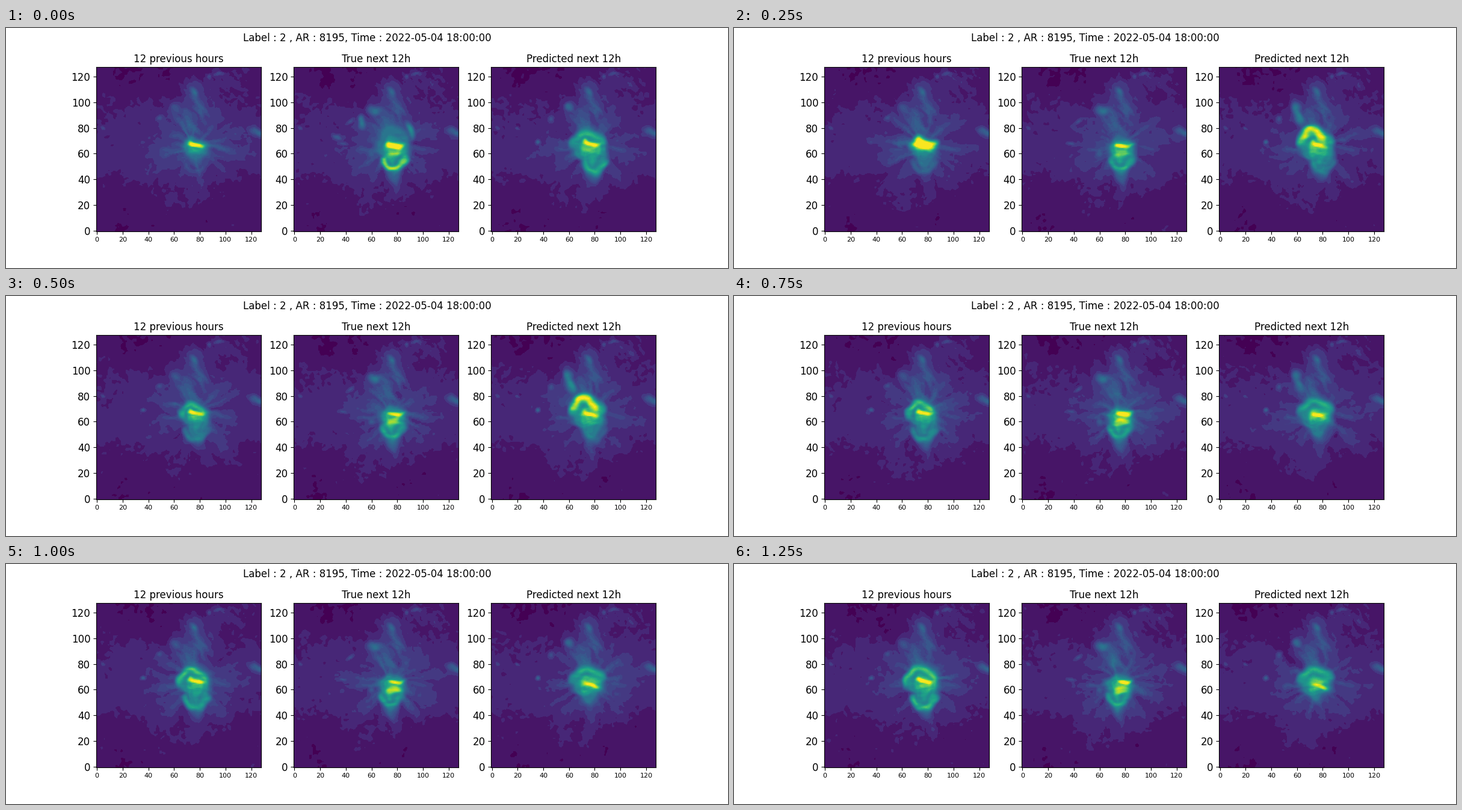
Animation of 1200 by 400 pixels, one loop 1500 ms. Source, as a matplotlib script:

```python
import numpy as np
import matplotlib.pyplot as plt
from matplotlib.animation import FuncAnimation
from matplotlib.colors import ListedColormap

N, FRAMES = 128, 6
plt.rcParams["font.family"] = "DejaVu Sans"


def noise(seed, sx, sy=None):
    """Periodic Gaussian-smoothed noise with unit deviation."""
    fx, fy = np.fft.fftfreq(N)[None, :], np.fft.fftfreq(N)[:, None]
    sy = sx if sy is None else sy
    keep = np.exp(-2 * np.pi**2 * ((sx * fx) ** 2 + (sy * fy) ** 2))
    raw = np.random.default_rng(seed).normal(size=(N, N))
    out = np.fft.ifft2(np.fft.fft2(raw) * keep).real
    out -= out.mean()
    return out / out.std()


gy, gx = np.mgrid[:N, :N].astype(float)
X = gx + 0.8 * noise(1, 3)
Y = gy + 0.8 * noise(2, 3)

# Streaks that run down to the right, and rays that leave the core
along, across = 0.6 * X - 0.8 * Y, 0.8 * X + 0.6 * Y
STREAK = noise(5, 4, 1.1)[across.astype(int) % N, along.astype(int) % N]
DIST = np.hypot(X - 76, Y - 66)
THETA = (np.arctan2(Y - 66, X - 76) / (2 * np.pi) * N).astype(int) % N
WAVE = 1.1 * np.sin((X - 69) / 2.6)


def blob(x, y, sx, sy, level, angle=0, power=1):
    a = np.radians(angle)
    dx, dy = X - x, Y - y
    u = (dx * np.cos(a) + dy * np.sin(a)) / sx
    v = (dy * np.cos(a) - dx * np.sin(a)) / sy
    return level * np.exp(-((u * u + v * v) ** power))


def lobe(x, y, half, end, level, q=2.0, stripe=0.07):
    """Half of a rounded shape, from y towards end, with nested bands."""
    h = end - y
    t = (Y - y) / h
    t = np.where(t < 0, -t * abs(h) / 7, t)
    u = (np.abs((X - x) / half) ** q + t**q) ** (1 / q)
    return level * np.clip(1 - u**2.6, 0, 1) * (1 + stripe * np.cos(21 * u))


def arch(x, y, rx, h, width, level):
    dy = (Y - y) / h
    ring = np.exp(-(((np.hypot((X - x) / rx, dy) - 1) * min(rx, abs(h)) / width) ** 2))
    return level * ring / (1 + np.exp(-6 * dy - 0.5))


def core(x, y, sx, sy, level, angle):
    return blob(x, y + WAVE, sx, sy, level, angle, 1.5)


def pulse(s, at, width):
    return np.exp(-(((s - at) / width) ** 4))


def before(s):
    """The region grows after a short burst."""
    burst, grown = pulse(s, 1, 0.7), min(s / 2.5, 1)
    return [
        lobe(78, 66, 12, 49 - 15 * grown, 0.40 + 0.03 * s, 1.7),
        lobe(78, 66, 14, 43 - 15 * grown, 0.27, 1.4),
        lobe(75.5, 63, 12 + s, 77 + 1.8 * s, 0.40 + 0.035 * s),
        arch(74, 64, 6 + s, 7 + s, 3, 0.4 + 0.27 * grown),
        arch(77, 57, 8, -10, 3.5, 0.22 + 0.085 * s),
        blob(77, 64, 9.5, 6.5, 0.6),
        core(77, 67, 7.5 + 2.5 * burst, 2.7 + 3 * burst, 1.08 + 0.15 * burst, -8),
        blob(36, 69, 2.6, 2.2, 0.15 + 0.15 * grown),
        blob(49, 86, 5, 3, 0.24),
        blob(62, 96, 6, 6, 0.25),
    ]


def actual(s):
    """A first flash fades and the core lights up again halfway."""
    fade, flash = np.exp(-2 * s), np.cos(np.pi * s / 3) ** 2
    x = 77.5 - 0.6 * s
    return [
        lobe(x, 66, 14, 33, 0.53, 1.4),
        lobe(x, 66, 15, 19 + 1.6 * s, 0.28, 1.25),
        lobe(76.5, 63, 12 + 6 * fade, 77 + 14 * fade, 0.46),
        arch(x, 59, 8, -9, 3, 0.54 + 0.3 * fade),
        blob(77, 62, 10, 8, 0.6),
        blob(76.5, 59.5, 8, 3.8, 0.65 + 0.25 * pulse(s, 3.8, 1.6), 0, 1.5),
        core(78 + 0.3 * s, 66, 8 - 0.5 * s, 2.2 + 1.6 * flash, 1 + 0.18 * flash, 0),
        blob(90, 78, 4, 8, 0.5 * fade, 10),
        blob(53, 84, 4, 5, 0.38 * fade),
        blob(33, 73, 6, 3, 0.29 * fade, -35),
        blob(38, 68, 5, 2, 0.25),
        blob(43, 85, 5, 2.5, 0.24, 20),
        blob(63, 94, 7, 5, 0.38),
        blob(60, 61, 4, 5, 0.27),
    ]


def forecast(s):
    """A loop rises, then the core sinks while the tail retracts."""
    rise, left = pulse(s, 1.5, 0.9), pulse(s, 1.9, 1.5)
    return [
        lobe(79.5 - 0.8 * s, 66, 13, 33 + 2.7 * s, 0.54 - 0.02 * s, 1.7),
        lobe(78, 66, 15, 29 + 2.5 * s, 0.27, 1.4),
        lobe(74.5, 61, 16, 88 - 0.5 * s, 0.52),
        arch(80, 57, 7, -10, 3.5, 0.56 * np.exp(-s / 3)),
        arch(74.5, 66, 11, 9, 3.5, 0.58),
        arch(72, 68, 8.5, 10, 3.8, 1.05 * rise),
        blob(76, 66 - 0.2 * s, 11, 7.5, 0.66, 0, 1.4),
        core(77, 68 - 1.1 * s, 7.5, 2.8, 0.98, -12),
        blob(61, 90, 4, 13, 0.48 * left, 14),
        blob(61, 97, 4.5, 4.5, 0.34),
        blob(36, 69, 2.3, 2.6, 0.33),
        blob(46, 86, 4, 4, 0.24),
        blob(20, 78, 1.6, 1.6, 0.23),
    ]


SHARED = [
    blob(75, 91, 17, 29, 1, 0, 1.4) * (0.24 + 0.04 * STREAK),
    blob(76, 108, 6, 2.6, 0.33, -55),
    blob(96, 122, 6, 2, 0.23, 8),
    blob(88, 121, 2.5, 2.5, 0.23),
    blob(122, 77, 8, 5, 1, -40) * (0.24 + 0.04 * STREAK),
    blob(125, 75, 4.5, 3, 0.31, -50),
    blob(3, 80, 3, 2.2, 0.22, -40),
    blob(57, 64, 13, 2.2, 0.22, 6),
    blob(97, 64, 17, 3, 0.21, -3),
    blob(25, 37, 4, 2, 0.12),
]


def backdrop(seed, s):
    rays = noise(seed + s, 14, 1.3)[THETA, DIST.astype(int) % N]
    base = 0.06 + 0.035 * np.exp(-(((Y - 70) / 30) ** 4))
    base -= blob(45, 118, 28, 14, 0.026, 0, 1.5)
    base += 0.008 * noise(20, 5) + 0.005 * noise(seed - 1, 1.8)
    base += 0.007 * noise(seed + 10 + s, 1.0)
    base += blob(98, 118, 17, 11, 1) * (0.025 + 0.04 * STREAK)
    return base + np.exp(-((DIST / 33) ** 2)) * (0.11 + 0.045 * rays)


def picture(region, seed, s):
    parts = [backdrop(seed, s), *SHARED, *region(s)]
    img = sum(np.maximum(p, 0) ** 4 for p in parts) ** 0.25
    grain = noise(seed + 20 + s, 2.2, 0.8) * np.clip(2 * img - 0.3, 0, 1)
    return img * (1 + 0.06 * grain)


# Viridis in flat bands, coarser at the dark end
t = np.linspace(0, 1, 256)
bands = np.where(t < 0.19, np.round(t / 0.055) * 0.055, np.round(t / 0.03) * 0.03)
cmap = ListedColormap(plt.get_cmap("viridis")(np.clip(bands, 0, 1)))

panels = {
    "12 previous hours": before,
    "True next 12h": actual,
    "Predicted next 12h": forecast,
}
fig, axes = plt.subplots(1, 3, figsize=(12, 4), dpi=100)
fig.suptitle("Label : 2 , AR : 8195, Time : 2022-05-04 18:00:00")
shows = []
for k, (ax, (title, region)) in enumerate(zip(axes, panels.items())):
    pics = [picture(region, 100 * (k + 1), s) for s in range(FRAMES)]
    image = ax.imshow(pics[0], origin="lower", cmap=cmap, vmin=0, vmax=1)
    shows.append((image, pics))
    ax.set_title(title)
    ax.set_xticks(range(0, N, 20))
    ax.set_yticks(range(0, N, 20))
    ax.tick_params(axis="x", labelsize=8)
    ax.tick_params(axis="y", labelsize=12)


def update(i):
    for image, pics in shows:
        image.set_data(pics[i])
    return [image for image, _ in shows]


anim = FuncAnimation(fig, update, frames=FRAMES, interval=250, repeat=True,
                     repeat_delay=0, init_func=lambda: update(0))
plt.show()
```
